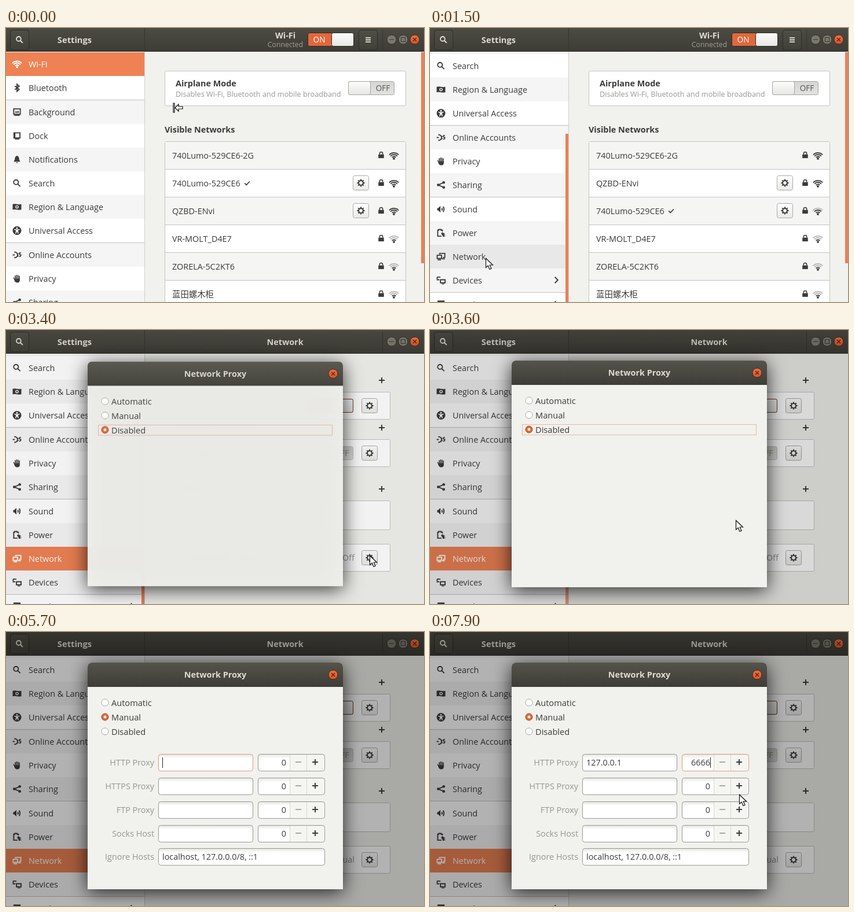
Animation of 722 by 474 pixels, one loop 8000 ms. Source, as an HTML page with a canvas:

```html
<!DOCTYPE html>
<html lang="en">
<head>
<meta charset="utf-8">
<title>Network proxy settings</title>
<style>
html, body { margin: 0; width: 100%; height: 100%; overflow: hidden; background: #f1f1ed; }
canvas { display: block; }
</style>
</head>
<body>
<canvas id="stage" width="722" height="474"></canvas>
<script>
const ctx = document.getElementById('stage').getContext('2d');
const W = 722, H = 474, LOOP = 8000, STEP = 100;
const INK = '#3b3b3b', MUTED = '#969692', ORANGE = '#e2683a', SELECTED = '#ee8254', PAGE = '#f1f1ed', LINE = '#c3c3bf';

const ramp = (t, a, b) => Math.min(1, Math.max(0, (t - a) / (b - a)));

function vertical(y, h, ...colors) {
  const g = ctx.createLinearGradient(0, y, 0, y + h);
  colors.forEach((c, i) => g.addColorStop(i / (colors.length - 1), c));
  return g;
}
function fill(x, y, w, h, color) {
  ctx.fillStyle = color;
  ctx.fillRect(x, y, w, h);
}
function box(x, y, w, h, r, bg, border) {
  ctx.beginPath();
  ctx.roundRect(x + .5, y + .5, w - 1, h - 1, r);
  ctx.fillStyle = bg;
  ctx.fill();
  ctx.strokeStyle = border;
  ctx.lineWidth = 1;
  ctx.stroke();
}
function disc(x, y, r, bg, border) {
  ctx.beginPath();
  ctx.arc(x, y, r, 0, 7);
  ctx.fillStyle = bg;
  ctx.fill();
  if (border) {
    ctx.strokeStyle = border;
    ctx.lineWidth = 1;
    ctx.stroke();
  }
}
function text(s, x, y, color = INK, { size = 14.4, bold = false, align = 'left' } = {}) {
  ctx.font = `${bold ? 700 : 400} ${size}px "Open Sans", "Noto Sans CJK SC", "Noto Sans CJK", sans-serif`;
  ctx.textAlign = align;
  ctx.fillStyle = color;
  ctx.fillText(s, x, y);
}
const bold = { bold: true }, right = { align: 'right' };

function faded(alpha, draw) {
  if (alpha <= 0) return;
  ctx.save();
  ctx.globalAlpha *= alpha;
  draw();
  ctx.restore();
}

// Icons live in a 16 by 16 box: [filled path, stroked path]
const ICONS = {
  bluetooth: ['', 'M4 4.5L12 11L8 14.5V1.5L12 5L4 11.5'],
  background: ['M4 9L6 6L8 8L10 5L12 9ZM3 13H13V15H3Z', 'M2 2H14V12H2Z'],
  dock: ['M2 3H5V12H2ZM4 13H12V15H4Z', 'M2.5 2.5H13.5V12H2.5Z'],
  bell: ['M8 1C4 2 4 6 4 8L2 12H14L12 8C12 6 12 2 8 1ZM6 13H10L8 15Z', ''],
  search: ['', 'M10.5 6.2A4.3 4.3 0 1 1 1.9 6.2A4.3 4.3 0 1 1 10.5 6.2M9.3 9.4L14 14'],
  flag: ['M0 3Q4 2 8 3T16 3V13Q12 14 8 13T0 13ZM8 5A3 3 0 1 0 8 11A3 3 0 1 0 8 5ZM8 6.5A1.5 1.5 0 1 1 8 9.5A1.5 1.5 0 1 1 8 6.5Z', ''],
  person: ['M8 0A8 8 0 1 0 8 16A8 8 0 1 0 8 0ZM8 2A1.6 1.6 0 1 1 8 5.2A1.6 1.6 0 1 1 8 2ZM3 5L7 6H9L13 5V6.5L10 7.5L11 13.5H9.8L8 9.5L6.2 13.5H5L6 7.5L3 6.5Z', ''],
  accounts: ['M0 7H4V9H0Z', 'M3 3H5Q9 4 9 8T5 13H3M8 6H11M8 10H11M15 4Q12 4 12.5 6T15 8Q15 11 12 11'],
  hand: ['M1 6H2.6L4 9V2.5H5.7V8H6.5V1H8.2V8H9V1.5H10.7V8H11.5V3H13.2V11Q13 15.5 8.5 15.5Q5 15.5 3.5 12Z', ''],
  share: ['M3 5.5A2.5 2.5 0 1 0 3 10.5A2.5 2.5 0 1 0 3 5.5ZM13 1A2.5 2.5 0 1 0 13 6A2.5 2.5 0 1 0 13 1ZM13 10A2.5 2.5 0 1 0 13 15A2.5 2.5 0 1 0 13 10Z', 'M13 3.5L3 8L13 12.5'],
  sound: ['M1 6H3L7 2V14L3 10H1Z', 'M9.5 5.5Q11 8 9.5 10.5M12 3Q15 8 12 13'],
  power: ['M8 9L11 6V8H14V10H16V11H14V13H16V14H14V15H11V13Z', 'M9 14H2V3H4V1.5H8V3H10.5V5'],
  network: ['M2 13H8V15H2ZM10 11H15V13H10Z', 'M5.5 4V2H15V9.5H11.5M1 5.5H9V11.5H1Z'],
  devices: ['M1 1H7V3H1ZM0 6H5V8H0ZM9 14H14V15.5H9Z', 'M1 2V6M7 7H15.5V12.5H7Z'],
  details: ['M2 1H14V4H2Z', 'M2.5 1.5H13.5V13H2.5Z'],
  lock: ['M2 7H14V15H2Z', 'M4.7 7V5A3.3 3.3 0 0 1 11.3 5V7'],
  check: ['', 'M3 8L6.5 11.5L13 4.5'],
  chevron: ['', 'M5.5 2.5L11 8L5.5 13.5'],
  plus: ['M7 3H9V7H13V9H9V13H7V9H3V7H7Z', ''],
  minus: ['M3 7.2H13V8.8H3Z', ''],
  menu: ['M3 3H13V5H3ZM3 7H13V9H3ZM3 11H13V13H3Z', '']
};
function icon(name, cx, cy, color = INK, scale = 1) {
  if (name === 'wifi') return wifi(cx, cy, 3, color);
  const [solid, lines] = ICONS[name];
  ctx.save();
  ctx.translate(cx - 8 * scale, cy - 8 * scale);
  ctx.scale(scale, scale);
  ctx.fillStyle = ctx.strokeStyle = color;
  ctx.lineWidth = 2;
  ctx.fill(new Path2D(solid), 'evenodd');
  ctx.stroke(new Path2D(lines));
  ctx.restore();
}
function wifi(x, y, level, color = INK) {
  disc(x, y + 5, 1.9, color);
  ctx.lineWidth = 1.8;
  [4.5, 8, 11.2].forEach((r, i) => {
    ctx.beginPath();
    ctx.arc(x, y + 6, r, -Math.PI * .76, -Math.PI * .24);
    ctx.strokeStyle = i < level ? color : '#b9b9b7';
    ctx.stroke();
  });
}
function gear(x, y) {
  box(x - 14, y - 13, 28, 26, 3, vertical(y - 13, 26, '#fff', '#e9e9e6'), '#a9a9a4');
  ctx.strokeStyle = INK;
  ctx.lineWidth = 2;
  ctx.beginPath();
  ctx.arc(x, y, 3.9, 0, 7);
  for (let a = 0; a < 8; a++) {
    const c = Math.cos(a * Math.PI / 4), s = Math.sin(a * Math.PI / 4);
    ctx.moveTo(x + c * 4, y + s * 4);
    ctx.lineTo(x + c * 6.6, y + s * 6.6);
  }
  ctx.stroke();
}
function toggle(x, y, on, border, label) {
  box(x, y, 80, 24, 3, on ? ORANGE : vertical(y, 24, '#d5d5d1', '#e3e3df'), border);
  text(on ? 'ON' : 'OFF', x + (on ? 20 : 60), y + 17, label, { size: 13.6, align: 'center' });
  box(x + (on ? 41 : 0), y, 39, 24, 3, vertical(y, 24, '#fdfdfc', '#e6e6e3'), border);
}

const barFill = () => vertical(0, 41, '#4d4c43', '#3c3b35');
function headerButton(x, name) {
  box(x, 3, 33, 35, 4, vertical(3, 35, '#504f46', '#414038'), '#2d2c28');
  icon(name, x + 16.5, 20.5, '#e6e4da', .9);
}
function headerBar() {
  fill(0, 0, W, 41, barFill());
  fill(0, 40, W, 1, '#2f2e2a');
  fill(239, 0, 1, 41, '#35342e');
  fill(650, 3, 1, 35, '#35342e');
  headerButton(7, 'search');
  text('Settings', 118.5, 25.5, '#dfdbd2', { ...bold, size: 14.7, align: 'center' });
  for (const x of [666, 686]) {
    disc(x, 20, 8, '#7b796e', '#33322d');
    ctx.strokeStyle = '#33322d';
    if (x === 666) fill(x - 4, 19.5, 8, 1, '#33322d');
    else ctx.strokeRect(x - 3.5, 16.5, 7, 7);
  }
  closeButton(706, 20);
}
function closeButton(x, y) {
  disc(x, y, 8, vertical(y - 8, 16, '#ee7144', '#dc5426'), '#45281c');
  ctx.strokeStyle = '#4a2413';
  ctx.lineWidth = 1.3;
  ctx.stroke(new Path2D(`M${x - 3} ${y - 3}l6 6m0 -6l-6 6`));
}

const PAGES = ['Wi-Fi wifi', 'Bluetooth bluetooth', 'Background background', 'Dock dock', 'Notifications bell',
  'Search search', 'Region & Language flag', 'Universal Access person', 'Online Accounts accounts', 'Privacy hand',
  'Sharing share', 'Sound sound', 'Power power', 'Network network', 'Devices devices', 'Details details']
  .map(s => [s.slice(0, s.lastIndexOf(' ')), s.slice(s.lastIndexOf(' ') + 1)]);
const GROUP_ENDS = [1, 7, 10, 14];

function sidebar(t, pointer) {
  const scroll = Math.round(203 * ramp(t, 350, 1100));
  const selected = t < 1900 ? 0 : 13;
  ctx.save();
  ctx.beginPath();
  ctx.rect(0, 41, 240, H);
  ctx.clip();
  fill(0, 41, 239, H, '#fff');
  let y = 42 - scroll;
  PAGES.forEach(([name, glyph], i) => {
    const active = i === selected;
    const hover = t >= 1200 && t < 1900 && pointer.y >= y && pointer.y < y + 41;
    fill(0, y, 239, 41, active ? SELECTED : hover ? '#e8e8e8' : i % 2 ? '#fff' : '#f5f5f5');
    const color = active ? '#fff' : INK;
    icon(glyph, 19, y + 20.5, color, .94);
    text(name, 39, y + 25.5, color);
    if (i > 13) icon('chevron', 218, y + 20, INK, .95);
    y += 41;
    if (GROUP_ENDS.includes(i)) fill(0, y++, 239, 1, '#c0c0bc');
  });
  fill(239, 41, 1, H, '#d0d0cb');
  faded(ramp(t, 300, 500) * (1 - ramp(t, 3400, 4300)), () =>
    fill(234, 42 + scroll * 141 / 203, 5, 318, '#ea8058'));
  ctx.restore();
}

function wifiPage(t) {
  text('Wi-Fi', 482.5, 18, '#dfdbd2', { ...bold, align: 'center' });
  text('Connected', 482.5, 33, '#a3a096', { size: 12.2, align: 'center' });
  toggle(521, 8, true, '#2d2c28', '#fff');
  headerButton(609, 'menu');
  fill(240, 41, W, H, PAGE);
  box(274, 74, 417, 61, 2, '#fff', LINE);
  text('Airplane Mode', 293, 101, INK, bold);
  text('Disables Wi-Fi, Bluetooth and mobile broadband', 293, 119, MUTED, { size: 12.7 });
  toggle(591, 92, false, '#a5a5a0', '#555');
  text('Visible Networks', 274, 181, INK, bold);
  box(274, 196, 417, 300, 2, '#fff', LINE);
  const mine = ['740Lumo-529CE6', 2, true], other = ['QZBD-ENvi', 3, true];
  const middle = t < 700 ? [['740Lumo-529CE6', 3, true], other] : [other, mine];
  const list = [['740Lumo-529CE6-2G', 3], ...middle, ['VR-MOLT_D4E7', 1], ['ZORELA-5C2KT6', 1], ['蓝田螺木柜', 1]];
  list.forEach(([name, level, known], i) => {
    const y = 197 + 48 * i, cy = y + 23.5;
    fill(275, y, 415, 47, i % 2 ? '#fff' : '#f5f5f4');
    fill(275, y + 47, 415, 1, LINE);
    text(name, 287, cy + 5.5);
    if (name === mine[0]) icon('check', 416.5, cy, INK, .85);
    if (known) gear(613, cy - .5);
    icon('lock', 648, cy - 1, INK, .8);
    wifi(670, cy + .5, level);
  });
  fill(717, 42, 5, 365, '#ea8058');
}

function networkPage(t) {
  fill(420, 0, 228, 40, barFill());
  text('Network', 482, 25.5, '#dfdbd2', { ...bold, align: 'center' });
  fill(240, 41, W, H, PAGE);
  [['OVUN Elec. Ethernet', 87], ['Lomvert Ethernet', 169], ['VPN', 275]].forEach(([name, cy]) => {
    text(name, 301, cy + 5, INK, bold);
    icon('plus', 649, cy);
  });
  [[107, 48], [189, 48], [295, 51], [370, 48]].forEach(([y, h]) => box(301, y, 363, h, 2, '#fff', LINE));
  text('Connected - 100 Mb/s', 322, 136);
  toggle(520, 119, true, '#70381d', '#fff');
  text('Cable unplugged', 322, 218);
  toggle(520, 201, false, '#c5c5c0', '#92928e');
  text('Not set up', 318, 326);
  text('Network Proxy', 322, 399, INK, bold);
  text(t < 4400 ? 'Off' : 'Manual', 602, 399, MUTED, right);
  [131, 213, 394].forEach(y => gear(628, y));
}

function entry(x, cy, w, focused) {
  box(x, cy - 15, w, 30, 4, vertical(cy - 15, 30, '#e2e2de', '#fff', '#fff', '#fff', '#fff'), focused ? '#dd9a78' : '#989893');
}
function entryText(value, x, cy, align, caret) {
  text(value, x, cy + 5, INK, { align });
  if (!caret) return;
  const end = align === 'right' ? x : x + ctx.measureText(value).width;
  fill(Math.round(end), cy - 9, 1, 18, '#222');
}
function proxyForm(t) {
  const host = t < 5800 ? '' : '127.0.0.1';
  const port = t < 7000 ? '0' : '6'.repeat(t < 7300 ? 1 : t < 7800 ? 2 : t < 7900 ? 3 : 4);
  const hostFocus = t >= 5100 && t < 6400, portFocus = t >= 6400;
  ['HTTP Proxy', 'HTTPS Proxy', 'FTP Proxy', 'Socks Host'].forEach((label, i) => {
    const cy = 226 + 41 * i, first = i === 0;
    text(label, 256, cy + 5, MUTED, right);
    entry(263, cy, 164, first && hostFocus);
    entryText(first ? host : '', 270, cy, 'left', first && hostFocus);
    entry(435, cy, 116, first && portFocus);
    fill(491, cy - 13, 58, 26, '#f5f5f2');
    fill(490, cy - 14, 1, 28, '#d5d5d1');
    fill(519, cy - 14, 1, 28, '#d5d5d1');
    entryText(first ? port : '0', 484, cy, 'right', first && portFocus);
    icon('minus', 505, cy - 1, '#969692');
    icon('plus', 534, cy - 1);
  });
  text('Ignore Hosts', 256, 394, MUTED, right);
  entry(263, 389, 288, false);
  entryText('localhost, 127.0.0.0/8, ::1', 270, 389, 'left');
}
function dialog(t) {
  const grow = 1 - (1 - ramp(t, 3210, 3420)) ** 2;
  ctx.translate(0, 249);
  ctx.scale(1, grow);
  ctx.translate(0, -249);
  ctx.globalAlpha = Math.min(1, grow * .97 + ramp(t, 3400, 3500) * .03);
  ctx.save();
  ctx.shadowColor = 'rgba(0,0,0,.8)';
  ctx.shadowBlur = 32;
  ctx.shadowOffsetY = 5;
  ctx.beginPath();
  ctx.roundRect(141, 53, 441, 392, [7, 7, 0, 0]);
  ctx.fillStyle = PAGE;
  ctx.fill();
  ctx.restore();
  ctx.beginPath();
  ctx.roundRect(141, 53, 441, 42, [7, 7, 0, 0]);
  ctx.fillStyle = vertical(53, 42, '#55544b', '#3d3c36');
  ctx.fill();
  text('Network Proxy', 361.5, 79, '#dfdbd2', { ...bold, align: 'center' });
  closeButton(565, 74);
  const chosen = t < 4400 ? 2 : 1;
  ['Automatic', 'Manual', 'Disabled'].forEach((label, i) => {
    const cy = 122 + 25 * i, on = i === chosen;
    disc(171, cy, 6, on ? ORANGE : '#fff', on ? '#a84c28' : '#a9a9a4');
    if (on) disc(171, cy, 2.4, '#fff');
    text(label, 182, cy + 6, INK, { size: 14.6 });
  });
  if (t < 5100) {
    ctx.strokeStyle = '#e2804f';
    ctx.lineWidth = 1;
    ctx.setLineDash([1, 1]);
    ctx.strokeRect(159.5, 113.5 + 25 * chosen, 404, 18);
    ctx.setLineDash([]);
  }
  if (chosen === 1) proxyForm(t);
}

// Pointer stops: time, x, y
const STOPS = [[0, 288, 137], [300, 288, 137], [400, 230, 170], [600, 130, 250], [1100, 104, 274], [1200, 100, 454],
  [1300, 95, 397], [1400, 95, 397], [1500, 96, 398], [1900, 96, 398], [2200, 583, 176], [2300, 583, 176],
  [2400, 650, 215], [2500, 698, 330], [2600, 652, 428], [2800, 640, 412], [3200, 628, 390], [3400, 628, 390],
  [4200, 228, 144], [4600, 224, 142], [4700, 224, 142], [5000, 294, 226], [5700, 294, 226], [5800, 412, 237],
  [5900, 413, 226], [6000, 413, 226], [6400, 470, 226], [6900, 470, 226], [7200, 598, 270], [7400, 567, 290],
  [7500, 567, 290], [7600, 543, 296], [7700, 543, 296], [7900, 534, 281], [8000, 534, 281]];
function pointerAt(t) {
  const i = STOPS.findIndex(s => s[0] > t), [t0, x0, y0] = STOPS[i - 1], [t1, x1, y1] = STOPS[i];
  const k = (t - t0) / (t1 - t0);
  return { x: Math.round(x0 + (x1 - x0) * k), y: Math.round(y0 + (y1 - y0) * k) };
}
function drawPointer(t, { x, y }) {
  if (t >= 5400 && t < 5800) return;
  const beam = t >= 5000 && t < 5400 || t >= 5900 && t < 7000;
  const shape = new Path2D(t <= 300 ? 'M1 -7H3V9H1ZM4 1L10 -5V-1H17V3H10V7Z'
    : beam ? 'M-4 -9H4V-7H1V7H4V9H-4V7H-1V-7H-4Z'
    : 'M.5 .5V16.5L4.3 13L7 19.5L10 18.2L7.2 12H12.5Z');
  ctx.save();
  ctx.translate(x, y);
  ctx.fillStyle = '#fff';
  ctx.strokeStyle = '#111';
  ctx.lineWidth = 1.2;
  ctx.fill(shape);
  ctx.stroke(shape);
  ctx.restore();
}

function draw(t) {
  const pointer = pointerAt(t), swap = ramp(t, 1900, 2200);
  headerBar();
  if (swap < 1) wifiPage(t);
  faded(swap, () => networkPage(t));
  sidebar(t, pointer);
  faded(.3 * ramp(t, 3300, 3900), () => fill(0, 0, W, H, '#000'));
  if (t >= 3300) faded(1, () => dialog(t));
  drawPointer(t, pointer);
}

// The screen refreshes ten times a second
function tick() {
  draw(Math.floor(performance.now() % LOOP / STEP) * STEP);
  requestAnimationFrame(tick);
}
tick();
</script>
</body>
</html>
```
